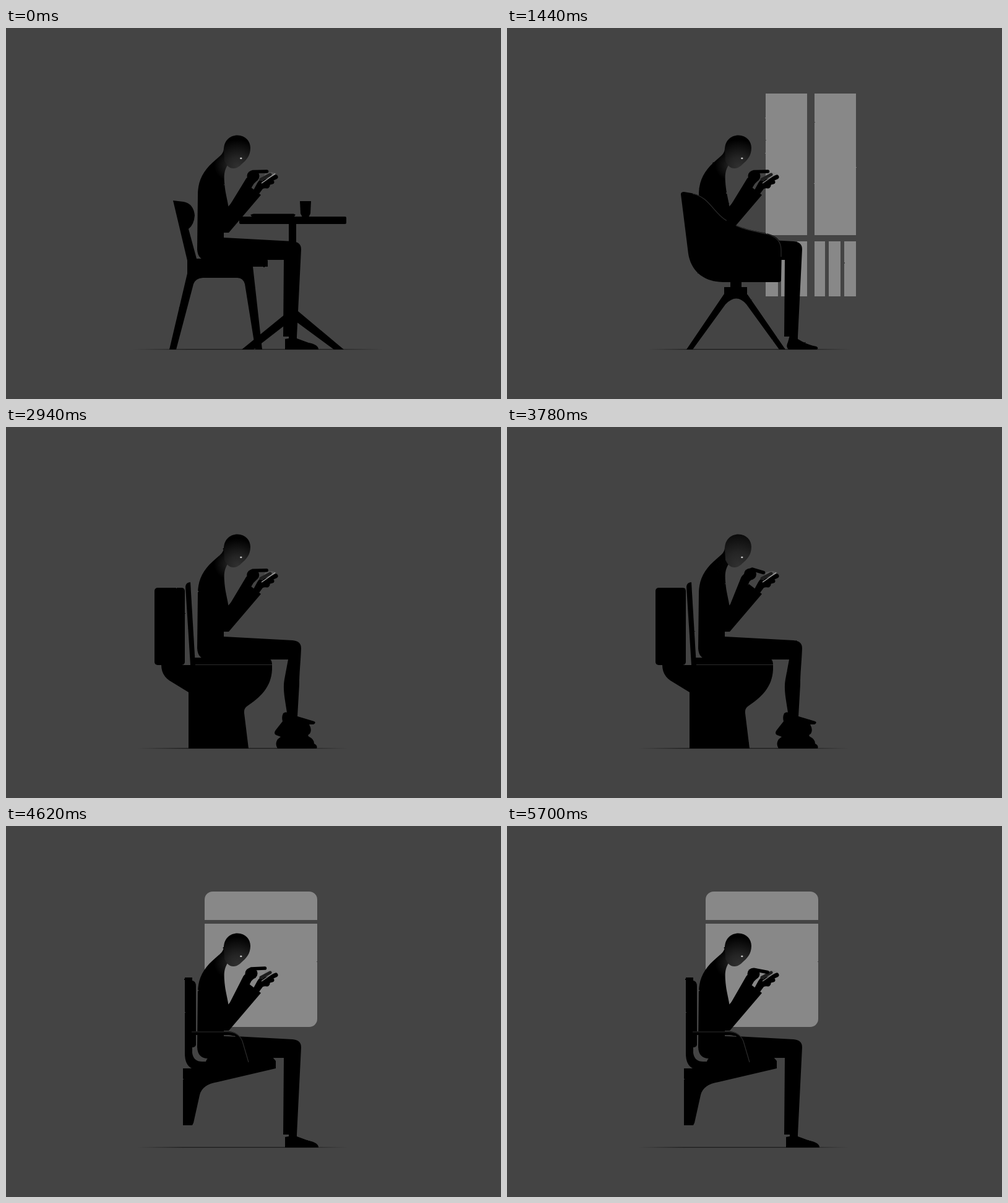
An HTML page that plays this animation: 800x600 px, repeating every 5.76 s.

```html
<!DOCTYPE html>
<html lang="en">
<head>
<meta charset="utf-8">
<title>Always on the phone</title>
<style>
  html, body { margin: 0; width: 100%; height: 100%; overflow: hidden; background: #444; }
  svg { display: block; width: 800px; height: 600px; }
  .pane { fill: #888; }
  .edge { fill: none; stroke: #2c2c2c; stroke-width: 1.2; }
  .digit { fill: none; stroke: #000; stroke-linecap: round; stroke-linejoin: round; }
</style>
</head>
<body>
<svg viewBox="0 0 800 600">
  <defs>
    <filter id="rough" filterUnits="userSpaceOnUse" x="200" y="95" width="420" height="435" color-interpolation-filters="sRGB">
      <feTurbulence id="noise" type="fractalNoise" baseFrequency="0.14" numOctaves="2" seed="1"/>
      <feDisplacementMap in="SourceGraphic" scale="1.6" xChannelSelector="R" yChannelSelector="G"/>
    </filter>
    <linearGradient id="fade">
      <stop offset="0" stop-color="#1c1c1c" stop-opacity="0"/>
      <stop offset=".22" stop-color="#1c1c1c"/>
      <stop offset=".78" stop-color="#1c1c1c"/>
      <stop offset="1" stop-color="#1c1c1c" stop-opacity="0"/>
    </linearGradient>
    <radialGradient id="faceGlow" gradientUnits="userSpaceOnUse" cx="374" cy="224" r="44">
      <stop offset="0" stop-color="#303030"/>
      <stop offset=".35" stop-color="#242424"/>
      <stop offset="1" stop-color="#000"/>
    </radialGradient>
    <radialGradient id="neckGlow" gradientUnits="userSpaceOnUse" cx="360" cy="222" r="24">
      <stop id="neckLight" offset="0" stop-color="#222"/>
      <stop offset="1" stop-color="#000"/>
    </radialGradient>
    <path id="torso" fill="url(#neckGlow)" d="M352 194C352 203 347 206 339 213C320 229 310 245 310 270L309 358Q310 375 325 376L352 376V331L360 329V292C358 278 354 266 353 250C352 238 353 230 358 222L366 214Z"/>
    <path id="legs" d="M340 339L352 339L463 345Q477 346 477 358L470 499H448L449 375H325Z"/>
    <path id="shoe" d="M457 497H470V502L489 509Q505 512 505 520H451V503L457 502Z"/>
  </defs>

  <rect width="800" height="600" fill="#444"/>
  <rect id="ground" y="519" height="1.3" fill="url(#fade)"/>

  <g filter="url(#rough)">
    <g class="scene">
      <rect x="377" y="305" width="173" height="12" rx="2"/>
      <path d="M457 315H469V460L472 458L546 520H530L469 475H458L400 520H381L457 458Z"/>
      <path d="M395 302L400 300.500H465L468 302L465 306H398Z"/>
      <path d="M475 280H493L492 300L489 306H479L476 300Z"/>
      <path d="M270 279L287 281Q303 284 305 303Q304 318 295 325L308 373H421L423 376V386H399L414 520H403L386 414Q383 404 374 404H318Q306 405 303 414L275 520H264L293 397V376Z"/>
      <use href="#torso"/><use href="#legs"/><use href="#shoe"/>
    </g>

    <g class="scene">
      <path class="pane" d="M418 106H485V335H418ZM497 106H564V335H497ZM418 345H438V434H418ZM443 345H463V434H443ZM469 345H485V434H469ZM497 345H514V434H497ZM520 345H539V434H520ZM545 345H564V434H545Z"/>
      <use href="#torso"/><use href="#legs"/>
      <path d="M457 497H470V503Q484 512 500 515Q504 517 501 520H455Q450 516 454 508Z"/>
      <path d="M361 408H379V419H388V430L450 520H440L387 447Q371 428 353 447L300 520H290L351 430V419H361Z"/>
      <path d="M281 269Q281 265 286 265L298 267C325 272 332 294 351 308C374 325 398 327 419 332C437 336 444 345 444 359L443 408Q443 411 438 411H349C314 410 297 390 293 365Z"/>
      <path class="edge" d="M300 268C325 273 332 295 351 309C374 325 398 328 419 333C436 337 443 346 443 359V370"/>
    </g>

    <g class="scene">
      <rect x="240" y="260" width="49" height="125" rx="5"/>
      <path d="M290 258Q291 251 298 251L306 385H298Z"/>
      <path d="M300 373H422Q430 375 430 384H300Z"/>
      <path d="M251 385H430V392C429 421 410 438 389 452Q384 456 385 463L392 520H295V429L264 410Q251 401 251 385Z"/>
      <path class="edge" d="M306 384.500H430"/>
      <use href="#torso"/>
      <path d="M340 339L352 339L463 345Q477 346 477 358C476 382 474 398 474 416L471 468H455C451 440 447 425 450 408L456 376H325Z"/>
      <path d="M448 463Q453 459 458 464L498 476Q502 478 497 481L490 481Q495 490 491 496Q486 499 490 501Q498 505 498 512Q504 515 502 520H439Q434 513 439 505L444 501L436 498Q432 495 436 490L447 476Q445 469 448 463Z"/>
    </g>

    <g class="scene">
      <rect class="pane" x="321" y="106" width="182" height="219" rx="13"/>
      <path fill="#444" d="M318 152H506V158H318Z"/>
      <use href="#torso"/><use href="#legs"/><use href="#shoe"/>
      <path d="M289 245H301V250Q307 251 307 259V354Q306 358 301 358V367Q303 381 317 381H323Q325 374 332 373H430L436 380V392L342 414Q317 418 313 435L303 480L301 484H286V392H300Q289 386 289 368Z"/>
      <path d="M300 332H360Q376 333 382 348L392 383H380L371 346Q369 338 360 338H300Z"/>
      <path class="edge" d="M300 333H358Q376 333 382 348L392 382"/>
      <path fill="#383838" d="M352 338.500L370 339.500L371 341L352 340Z"/>
    </g>
  </g>

  <path fill="url(#faceGlow)" d="M352 197C352 182 362 173.500 374 173.500C387 174 395 183 395 194C395 207 388 214 380 221C375 226 371 227 367 227C361 227 357 223 353 215Z"/>
  <ellipse id="eye" cx="379.800" cy="210.800" rx="1.700" ry="1.200" fill="#ccc"/>

  <path id="sleeve" class="digit" style="stroke-width:15;stroke-linecap:butt"/>
  <path d="M352 331H360L412 270L391 254L358 290Z"/>
  <path d="M400 262L406 251Q410 244 417 242L428 247L426 257L415 260L409 268Z"/>
  <path fill="#777" d="M413 247L419 235L428 233L437 235L417 251Z" opacity=".4"/>
  <path class="digit" stroke-width="7" d="M418 249L436 241M418 252L430 249M412 255L422 256"/>
  <path class="digit" style="stroke:#1d1d1d;stroke-width:5" d="M412 245L427 237"/>
  <path id="screen" fill="none" stroke-width="1.400" d="M413 251L435 235.500"/>
  <ellipse id="palm" rx="10" ry="9.500"/>
  <path id="finger" class="digit" stroke-width="5.500"/>
</svg>

<script>
const FRAME = 60, SCENE = 1440, SCENES = 4;
const grounds = [[205, 610], [228, 556], [213, 552], [213, 552]];

// time, palm x y, knuckle x y, fingertip x y, glow
const poses = [
  [0, 400, 239.500, 399, 232.500, 421.500, 232, 0],
  [300, 397, 238.500, 396, 231, 418.500, 230, .1],
  [900, 393.500, 238, 396, 230, 414.500, 235.500, 1],
  [1080, 394, 238.500, 398, 231.500, 410, 241, 1],
  [1380, 399, 239, 400, 232.500, 421, 236.500, .1],
  [1440, 400, 239.500, 399, 232.500, 421.500, 232, 0]
];

const $ = id => document.getElementById(id);
const set = (id, attrs) => {
  for (const key in attrs) $(id).setAttribute(key, attrs[key]);
};
const scenes = document.querySelectorAll('.scene');

function poseAt(t) {
  const i = poses.findIndex(p => p[0] > t);
  const a = poses[i - 1], b = poses[i];
  const u = (t - a[0]) / (b[0] - a[0]);
  const k = u * u * (3 - 2 * u);
  return a.slice(1).map((v, n) => v + (b[n + 1] - v) * k);
}

function render(frame) {
  const time = frame * FRAME;
  const current = Math.floor(time / SCENE);
  const [px, py, kx, ky, tx, ty, glow] = poseAt(time % SCENE);
  const [left, right] = grounds[current];

  scenes.forEach((s, i) => s.setAttribute('display', i === current ? 'inline' : 'none'));
  set('ground', { x: left, width: right - left });
  set('noise', { seed: 1 + Math.floor(frame / 3) % 3 });

  // The cuff swings a little further than the palm.
  const cuff = 386 + (px - 394) * 1.4;
  set('sleeve', { d: `M366 294L${cuff} ${py + 8}L${cuff + 6} ${py + 2}` });
  set('palm', { cx: px - .5, cy: py });
  set('finger', { d: `M${px - 3} ${py - 4}L${kx} ${ky}L${tx} ${ty}` });

  const neck = Math.round(34 - 30 * glow);
  set('faceGlow', { r: 44 + 18 * glow });
  set('neckLight', { 'stop-color': `rgb(${neck},${neck},${neck})` });
  set('screen', { stroke: current % 2 ? '#888' : '#a8a8a8' });
}

let shown = -1;
const start = performance.now();
function tick() {
  const frame = Math.floor((performance.now() - start) / FRAME) % (SCENES * SCENE / FRAME);
  if (frame !== shown) render(shown = frame);
  requestAnimationFrame(tick);
}
tick();
</script>
</body>
</html>
```
